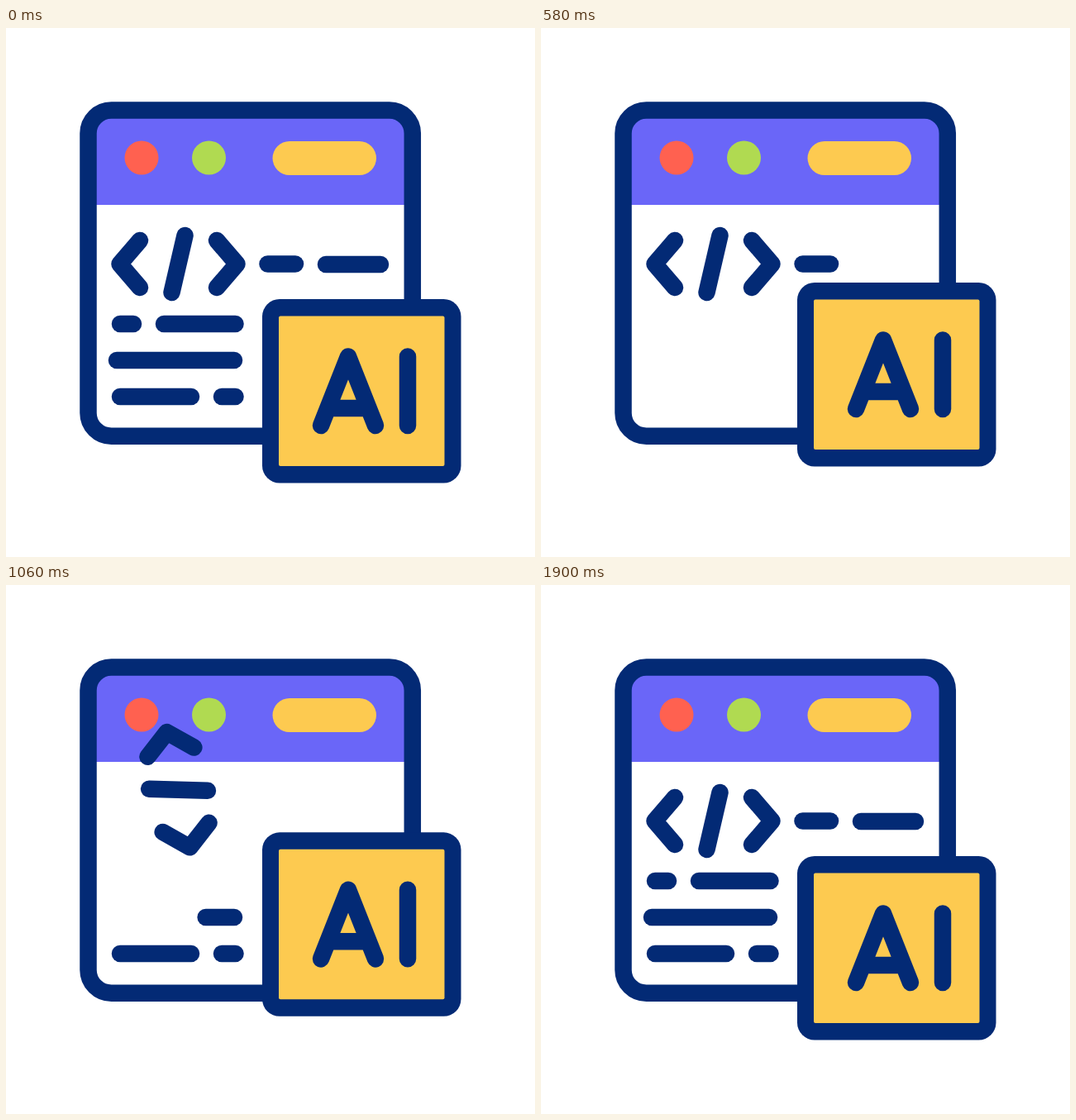
An HTML page that plays this animation: 640x640 px, repeating every 1.96 s.

```html
<!DOCTYPE html>
<html lang="en">
<head>
<meta charset="utf-8">
<title>AI coding</title>
<style>
html, body { margin: 0; width: 100%; height: 100%; overflow: hidden; background: #fff; }
svg { display: block; width: 100%; height: 100%; }
.ink { fill: none; stroke: #032a75; stroke-width: 20.5; stroke-linecap: round; stroke-linejoin: round; }
</style>
</head>
<body>
<svg viewBox="0 0 640 640">
  <path fill="#6a66f8" d="M100 214V127a27 27 0 0 1 27-27H465a27 27 0 0 1 27 27V214Z"/>
  <rect class="ink" x="99.5" y="99.5" width="392.3" height="394.3" rx="28"/>
  <circle cx="164" cy="157" r="20.5" fill="#ff6150"/>
  <circle cx="245.5" cy="157" r="20.5" fill="#b0da51"/>
  <rect x="322.5" y="137" width="125.5" height="41" rx="20.5" fill="#fdca50"/>
  <!-- Each bar runs from the end where it grows and into which it retracts. -->
  <g class="row ink"><path d="M224 446H138"/><path d="M277.5 446H261"/></g>
  <g class="row ink"><path d="M276 402H134"/></g>
  <g class="row ink"><path d="M191 358H277.5"/><path d="M138 358H154"/></g>
  <g class="row ink"><path d="M453 286H387"/><path d="M350 285.5H316.5"/></g>
  <path id="code" class="ink" d="M162 257L137.5 285.5L162 314M216.5 251L200.5 320M255 257L279.5 285.5L255 314"/>
  <g id="chip">
    <rect x="310" y="328" width="240.5" height="222.5" rx="21" fill="#032a75"/>
    <rect x="330" y="348.5" width="200.5" height="181.5" rx="2" fill="#fdca50"/>
    <path class="ink" d="M381 481L414 397.5L447 481M394 460H434M486 397.5V481"/>
  </g>
</svg>
<script>
const LOOP = 1960, PEAK = 960;
const code = document.getElementById('code');
const chip = document.getElementById('chip');
const rows = [...document.querySelectorAll('.row')].map(row => [...row.children]);
rows.flat().forEach(bar => bar.setAttribute('pathLength', 1));

const clamp = x => Math.min(1, Math.max(0, x));
const ramp = (t, a, b) => clamp((t - a) / (b - a));
const ease = x => x ** 1.8 / (x ** 1.8 + (1 - x) ** 1.8);
const move = (t, a, b) => ease(ramp(t, a, b));
const bump = (t, a, b) => t < PEAK ? move(t, a, PEAK) : 1 - move(t, PEAK, b);

// Rows take equal turns from the bottom up; the bars of a row share its turn.
function drawRows(t) {
  const erased = rows.length * ramp(t, 153, 642);
  const grown = rows.length * ramp(t, 800, 1538) ** 1.125;
  rows.forEach((bars, r) => bars.forEach((bar, i) => {
    const part = turns => clamp((turns - r) * bars.length - i);
    const size = 1 - part(erased) + part(grown);
    bar.style.visibility = size > 0 ? 'visible' : 'hidden';
    bar.style.strokeDasharray = `${size} 2`;
  }));
}

function draw(t) {
  drawRows(t);
  chip.setAttribute('transform', `translate(0 ${-29.3 * bump(t, 0, 1890)})`);
  const hop = -50 * bump(t, 600, 1250);
  const turn = 360 * move(t, 763, 1238);
  code.setAttribute('transform', `translate(0 ${hop}) rotate(${turn} 208.5 285.5)`);
}

function frame() {
  draw(performance.now() % LOOP);
  requestAnimationFrame(frame);
}
frame();
</script>
</body>
</html>
```
